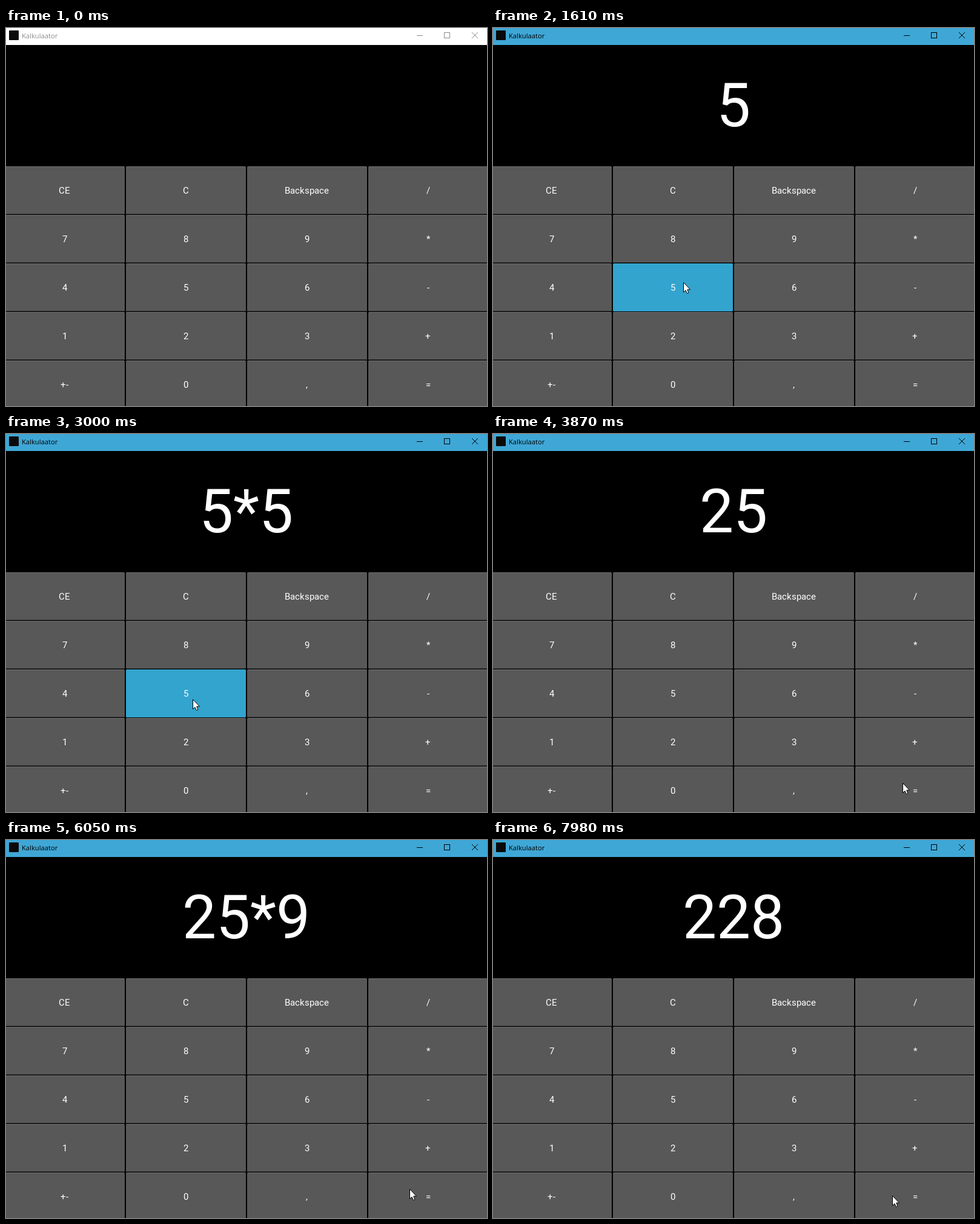
Recreate the animation shown at these times as an HTML page. Size 794 px wide and 623 px high, loop 8 s.

```html
<!DOCTYPE html>
<html lang="et">
<head>
<meta charset="utf-8">
<title>Kalkulaator</title>
<style>
html, body { margin: 0; width: 100%; height: 100%; overflow: hidden; background: #000; }
svg { display: block; width: 794px; height: 623px; }
text { font-family: Roboto, sans-serif; fill: #fff; }
#title { font: 11.2px "Open Sans", "Noto Sans", sans-serif; }
.face { fill: #585858; }
.held .face { fill: #32a4ce; }
.held .edge { display: none; }
</style>
</head>
<body>
<svg viewBox="0 0 794 623" xmlns="http://www.w3.org/2000/svg">
  <rect width="794" height="623"/>
  <rect id="bar" width="794" height="28"/>
  <rect x="5" y="4" width="16" height="16" rx="1" fill="#0a0a0a"/>
  <text id="title" x="26" y="17">Kalkulaator</text>
  <g id="controls" fill="none">
    <path d="M678 12.5h10M723.5 7.5h9v9h-9z" shape-rendering="crispEdges"/>
    <path d="M769 7l10 10M779 7l-10 10"/>
  </g>
  <text id="display" font-size="100"></text>
  <g id="keys"></g>
  <path id="cursor" fill="#fff" stroke="#000" stroke-linejoin="round"
        d="M.5 .5V16.5L4 13.2 6.4 18.5 8.8 17.5 6.8 12H11.5z"/>
</svg>
<script>
const LOOP = 8000, REFRESH = 78;
const ENTER = 70, ACTIVATE = 520;
const SETTLE = 150, HOLD = 155;
const CENTER = 397, CELL_W = 200, CELL_H = 80;
const $ = id => document.getElementById(id);

// Pointer stops: time, x, y and the key pressed there, if any
const stops = [
  [ENTER, 690, 600],
  [ACTIVATE, 678, 90],
  [820, 672, 160],
  [1530, 314, 419, "5"],
  [2440, 712, 352, "*"],
  [2920, 308, 437, "5"],
  [3550, 711, 597, "="],
  [4420, 226, 287],
  [4650, 273, 397],
  [5100, 688, 354, "*"],
  [5640, 500, 350, "9"],
  [5970, 666, 575],
  [6280, 666, 575, "="],
  [6810, 684, 510, "+"],
  [7290, 500, 508, "3"],
  [7730, 662, 586, "="],
  [7950, 659, 586]
].map(([at, x, y, key]) => ({
  at, x, y, key,
  arrive: key ? at - SETTLE : at,
  leave: key ? at + HOLD : at
}));

function add(parent, name, attrs) {
  const el = document.createElementNS("http://www.w3.org/2000/svg", name);
  for (const key in attrs) el.setAttribute(key, attrs[key]);
  return parent.appendChild(el);
}

// Centres text with every glyph on a whole pixel
const ruler = document.createElement("canvas").getContext("2d");
function setText(el, label, size, center, baseline) {
  ruler.font = `${size}px Roboto, sans-serif`;
  const widths = [...label].map(c => Math.round(ruler.measureText(c).width));
  let x = Math.floor(center - widths.reduce((a, b) => a + b, 0) / 2);
  const xs = widths.map(w => (x += w) - w);
  el.textContent = label;
  el.setAttribute("x", xs.join(" "));
  el.setAttribute("y", baseline);
}

const keys = {};
"CE C Backspace / 7 8 9 * 4 5 6 - 1 2 3 + +- 0 , =".split(" ").forEach((label, i) => {
  const x = i % 4 * CELL_W - 2, y = 228 + Math.floor(i / 4) * CELL_H;
  const key = keys[label] = add($("keys"), "g", {});
  const edge = { class: "edge", x: x + 1, width: CELL_W - 4, height: 1 };
  add(key, "rect", { class: "face", x, y, width: CELL_W - 2, height: CELL_H - 1, rx: 1.5 });
  add(key, "rect", { ...edge, y, fill: "#fff", opacity: .14 });
  add(key, "rect", { ...edge, y: y + CELL_H - 2, opacity: .4 });
  setText(add(key, "text", { "font-size": 15 }), label, 15, x + CELL_W / 2 - 1, y + 45);
});

function evaluate(sum) {
  const [, a, op, b] = sum.match(/(\d+)([*+])(\d+)/);
  return String(op === "*" ? a * b : +a + +b);
}

const enter = (entry, key) => key === "=" ? evaluate(entry) : entry + key;
const ease = k => k * k * (3 - 2 * k);

function pointerAt(t) {
  const i = stops.findIndex(s => s.arrive > t);
  if (i === 0) return [stops[0].x, stops[0].y];
  const from = stops.at(i < 0 ? -1 : i - 1), to = i < 0 ? from : stops[i];
  const k = t <= from.leave || to === from ? 0 : ease((t - from.leave) / (to.arrive - from.leave));
  return [from.x + (to.x - from.x) * k, from.y + (to.y - from.y) * k].map(Math.round);
}

function render(t) {
  const active = t >= ACTIVATE;
  const ink = active ? "#000" : "#8c8c8c";
  $("bar").setAttribute("fill", active ? "#3fa7d6" : "#fff");
  $("title").style.fill = ink;
  $("controls").setAttribute("stroke", ink);

  const pressed = stops.filter(s => s.key && s.at <= t);
  const last = pressed.at(-1);
  const held = last && t < last.leave ? last.key : null;
  for (const label in keys) keys[label].classList.toggle("held", label === held);
  setText($("display"), pressed.map(s => s.key).reduce(enter, ""), 100, CENTER, 162);

  const refreshed = Math.floor(t / REFRESH) * REFRESH;
  $("cursor").setAttribute("visibility", t < ENTER ? "hidden" : "visible");
  $("cursor").setAttribute("transform", `translate(${pointerAt(refreshed)})`);
}

const start = performance.now();
function tick() {
  render((performance.now() - start) % LOOP);
  requestAnimationFrame(tick);
}
tick();
</script>
</body>
</html>
```
